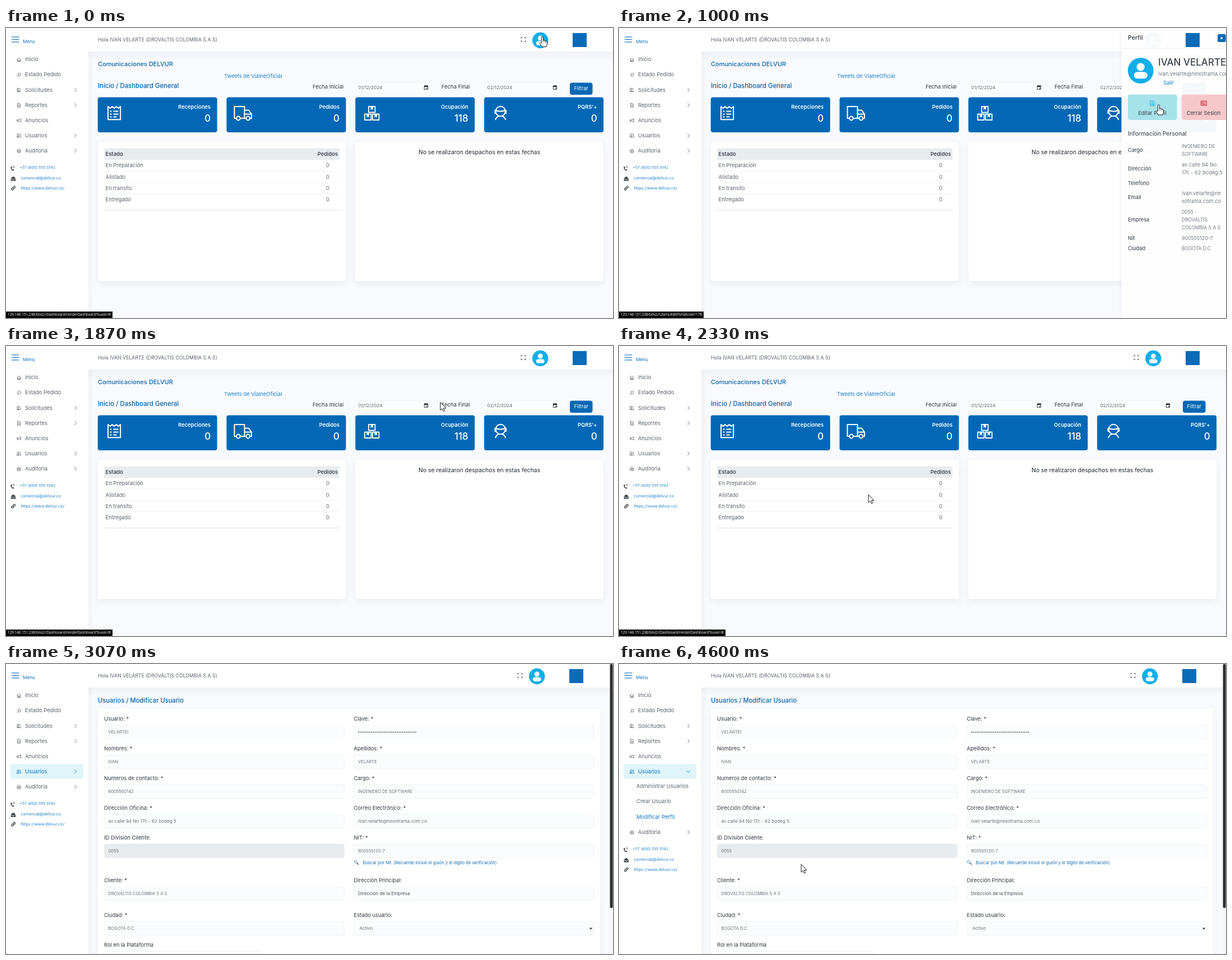
Write an HTML page with a canvas that moves like this. It is 1083 px wide and 517 px high and loops after 4.67 s.

```html
<!DOCTYPE html>
<html lang="es">
<head>
<meta charset="utf-8">
<title>Panel</title>
<style>
html, body { margin: 0; width: 100%; height: 100%; overflow: hidden; background: #fff; }
canvas { display: block; width: 1083px; height: 517px; }
</style>
</head>
<body>
<canvas id="stage"></canvas>
<script>
const W = 1083, H = 517, LOOP = 4670, STEP = LOOP / 70;
const canvas = document.getElementById('stage');
const c = canvas.getContext('2d');
const dpr = window.devicePixelRatio || 1;
canvas.width = W * dpr;
canvas.height = H * dpr;

const BLUE = '#0268b6', LINK = '#1c80c9', GRAY = '#5c636c', DARK = '#2f363f', SOFT = '#737a83';
const BRAND = 'DELVUR', USER = 'IVAN VELARTE', MAIL = 'ivan.velarte@nexotrama.com.co';
const FIRM = 'DROVALTIS COLOMBIA S A S', NIT = '900555120-7';
const HOST = '129.146.151.238/bilv2//';
const DASH_URL = HOST + 'Dashboard/renderDashboardTouser/#';
const EDIT_URL = HOST + 'Users/editPortalUser/178';

const clamp = v => Math.max(0, Math.min(1, v));
const ramp = (t, a, b) => clamp((t - a) / (b - a));
const ease = v => v * v * (3 - 2 * v);

// y is the middle of the capitals
function text(s, x, y, size, color, weight = 400, align = 'left', family = 'Inter') {
  c.font = `${weight} ${size}px ${family}, "Open Sans", sans-serif`;
  c.fillStyle = color;
  c.textAlign = align;
  c.fillText(s, x, y + size * 0.36);
}

function box(x, y, w, h, r, fill, line) {
  c.beginPath();
  c.roundRect(x, y, w, h, r);
  c.fillStyle = fill;
  c.fill();
  if (line) { c.strokeStyle = line; c.lineWidth = 0.8; c.stroke(); }
}

function card(x, y, w, h) {
  c.save();
  c.shadowColor = 'rgba(40,60,100,.07)';
  c.shadowBlur = 14 * dpr;
  c.shadowOffsetY = 5 * dpr;
  box(x, y, w, h, 4, '#fff');
  c.restore();
}

function path(d, x, y, { line, fill, w = 0.9 }) {
  const p = new Path2D(d);
  c.save();
  c.translate(x, y);
  if (fill) { c.fillStyle = fill; c.fill(p); }
  if (line) { c.strokeStyle = line; c.lineWidth = w; c.lineJoin = 'round'; c.stroke(p); }
  c.restore();
}

function disc(x, y, r, fill) {
  c.beginPath();
  c.arc(x, y, r, 0, Math.PI * 2);
  c.fillStyle = fill;
  c.fill();
}

function rule(x1, x2, y, color, w = 0.8) {
  c.fillStyle = color;
  c.fillRect(x1, y - w / 2, x2 - x1, w);
}

function avatar(x, y, r) {
  disc(x, y, r, '#12aee9');
  c.save();
  c.beginPath();
  c.arc(x, y, r * 0.9, 0, Math.PI * 2);
  c.clip();
  disc(x, y - r * 0.28, r * 0.31, '#fff');
  box(x - r * 0.52, y + r * 0.1, r * 1.04, r * 0.52, r * 0.26, '#fff');
  c.restore();
}

const ICONS = {
  home: 'M-3.6 0L0-3.2 3.6 0M-2.5-.8V3.4H2.5V-.8M-.8 3.4V1H.8V3.4',
  search: 'M3.3-.6A2.6 2.6 0 1 1-1.9-.6 2.6 2.6 0 1 1 3.3-.6M-1.2 1.2L-3.4 3.4',
  edit: 'M1.2-3H-3V3H3V0M-1.2 1.2L3.2-3.2M-2-1H0M-2 2H1',
  doc: 'M-2.5-3.5H1L2.7-1.8V3.5H-2.5ZM-1.2-.5H1.4M-1.2 1.5H1.4',
  horn: 'M-3.5-1H-.5L3.3-2.8V2.8L-.5 1H-3.5ZM-2 1V3.2',
  users: 'M.2-1.4A1.7 1.7 0 1 1-3.2-1.4 1.7 1.7 0 1 1 .2-1.4M-4 3Q-3.6 1-1.5 1T1 3ZM1-3Q3.2-3 2.8-.5L1.5 0M2.2.8A1.4 1.4 0 1 1 2.1 3.6',
  audit: 'M-3.5-.2L0-3.2 3.5-.2M-3.2 0H3.2L2.6 3.2H-2.6ZM0 0V3.2'
};
const MENU = [['Inicio', 'home'], ['Estado Pedido', 'search'], ['Solicitudes', 'edit', 1],
  ['Reportes', 'doc', 1], ['Anuncios', 'horn'], ['Usuarios', 'users', 1], ['Auditoria', 'audit', 1]];

function chevron(x, y, turn, color) {
  c.save();
  c.translate(x, y);
  c.rotate(turn * Math.PI / 2);
  path('M-1.6-3.4L1.8 0-1.6 3.4', 0, 0, { line: color });
  c.restore();
}

function sidebar(open, active) {
  c.fillStyle = '#fff';
  c.fillRect(0, 0, 147, H);
  for (const y of [16, 20.5, 25]) rule(10, 23.5, y, '#1678c4', 1.2);
  text('Menu', 30, 24, 8.2, '#0e72bf');
  if (active) box(8, 178, 130, 27, 4, '#dff5fa');
  const drop = 81 * open;
  MENU.forEach(([name, icon, sub], i) => {
    const on = active && i === 5;
    const y = 56 + i * 27.05 + (i > 5 ? drop : 0);
    const color = on ? '#0b73bf' : GRAY;
    path(ICONS[icon], 23, y + 0.5, { line: color, w: 0.85 });
    text(name, 34, y, 9.45, color);
    if (sub) chevron(124, y + 0.5, on ? open : 0, color);
  });
  if (open) {
    c.save();
    c.beginPath();
    c.rect(0, 205, 147, drop);
    c.clip();
    text('Administrar Usuarios', 31, 218, 9.45, GRAY);
    text('Crear Usuario', 31, 245, 9.45, GRAY);
    text('Modificar Perfil', 31, 272.5, 9.45, '#0b73bf');
    c.restore();
  }
  path('M-3-2.8L-1.2-3.2-.4-1-1.4 0Q-.8 2 .6 2.4L1.6 1.6 3.2 3 2 4.4Q-3.6 4-3-2.8', 11.5, 250 + drop, { fill: '#41474e' });
  path('M0-3Q3-3 3 .2M0-1.2Q1.2-1.2 1.2.2', 12.4, 249 + drop, { line: '#41474e', w: 0.8 });
  path('M-4.2-.8L0-4 4.2-.8V4H-4.2Z', 13, 268.5 + drop, { fill: '#41474e' });
  path('M-4-.2L0 2.2 4-.2', 13, 268.5 + drop, { line: '#fff', w: 0.8 });
  c.save();
  c.translate(13, 285.5 + drop);
  c.rotate(-Math.PI / 4);
  path('M0-1.6H-2.6A1.6 1.6 0 0 0-2.6 1.6H-.6M0 1.6H2.6A1.6 1.6 0 0 0 2.6-1.6H.6M-1.6 0H1.6', 0, 0, { line: '#41474e', w: 1.3 });
  c.restore();
  text('+57 (600) 555 0142', 24.5, 248.5 + drop, 6.8, LINK);
  text('comercial@delvur.co', 26.5, 267 + drop, 7.2, LINK);
  text('https://www.delvur.co/', 26.5, 285.5 + drop, 7.2, LINK);
}

function logo(dx) {
  c.fillStyle = '#0b6bb8';
  c.fillRect(1011 + dx, 9, 25, 25);
}

function frame(dx, pics) {
  c.fillStyle = '#f9fafd';
  c.fillRect(0, 0, W, H);
  let g = c.createLinearGradient(0, 42, 0, 58);
  g.addColorStop(0, 'rgba(60,70,90,.05)');
  g.addColorStop(1, 'rgba(60,70,90,0)');
  c.fillStyle = g;
  c.fillRect(147, 42, W - 147, 16);
  g = c.createLinearGradient(147, 0, 157, 0);
  g.addColorStop(0, 'rgba(60,70,90,.045)');
  g.addColorStop(1, 'rgba(60,70,90,0)');
  c.fillStyle = g;
  c.fillRect(147, 42, 10, H - 42);
  c.fillStyle = '#fff';
  c.fillRect(147, 0, W - 147, 42);
  text(`Hola ${USER} (${FIRM})`, 164, 21, 8.75, GRAY);
  path('M-4-1.6V-3.8H-1.6M1.6-3.8H4V-1.6M4 1.6V3.8H1.6M-1.6 3.8H-4V1.6', 923 + dx, 20.5, { line: '#444b54', w: 1 });
  if (pics) { avatar(953.3 + dx, 22, 14.2); logo(dx); }
}

const TILES = [['Recepciones', '0'], ['Pedidos', '0'], ['Ocupación', '118'], ["PQRS'+", '0']];

function tileIcons() {
  const pen = { line: '#fff', w: 2 };
  path('M182 140l3.7 3 3.7-3 3.7 3 3.7-3 3.7 3 3.7-3V163.3H182Z', 0, 0, pen);
  path('M185.5 148.5h3M191.5 148.5h9M185.5 153.5h3M191.5 153.5h9M185.5 158.5h3M191.5 158.5h6', 0, 0, { line: '#fff', w: 1.8 });
  path('M411 161H407.5V140H425.5V161H418M425.5 146.5H433L438 153.5V161H435.5M425.5 161H428M425.5 153.5H437', 0, 0, pen);
  for (const x of [414.5, 431.8]) path('M3.4 0A3.4 3.4 0 1 1-3.4 0 3.4 3.4 0 1 1 3.4 0', x, 161, pen);
  for (const [x, y] of [[647, 140], [640, 153.5], [654, 153.5]]) {
    path('M0 0H11.5V10.5H0Z', x, y, { line: '#fff', w: 1.8 });
    path('M3.6 0H7.9V6L5.75 4.5 3.6 6Z', x, y, { fill: '#fff' });
  }
  path('M891 148.5A8.7 8.7 0 1 1 873.6 148.5 8.7 8.7 0 1 1 891 148.5M874 147Q882 150 890.5 147M873 164Q875 158.5 879 157M891.5 164Q889.5 158.5 885.5 157', 0, 0, pen);
  box(871.5, 146, 3.4, 7, 1, '#fff');
  box(889.8, 146, 3.4, 7, 1, '#fff');
}

function dateBox(x, value) {
  box(x, 97.5, 136, 18, 2, '#fcfdfe', '#f1f3f6');
  text(value, x + 5.5, 106, 8.2, '#5f666f');
  path('M-3.2-2.8H3.2V3.4H-3.2Z', x + 126.5, 106, { line: '#20242a', w: 0.9 });
  path('M-3.2-3.2H3.2V-1H-3.2ZM.3.6H2V2.3H.3ZM-2.2-4H-1.2V-3H-2.2ZM1.2-4H2.2V-3H1.2Z', x + 126.5, 106, { fill: '#20242a' });
}

function dashboard() {
  frame(0, true);
  text('Comunicaciones ' + BRAND, 164, 64.5, 11, '#0a63ab', 500);
  text('Tweets de VialneOficial', 389, 86, 9.4, LINK);
  text('Inicio / Dashboard General', 164, 103, 11.4, '#0a63ab', 500);
  text('Fecha Inicial', 547, 104.5, 9.45, DARK);
  text('Fecha Final', 777, 104.5, 9.45, DARK);
  dateBox(623, '01/12/2024');
  dateBox(853, '02/12/2024');
  box(1006, 97.5, 40.5, 21.5, 4, BLUE);
  text('Filtrar', 1026.2, 108, 9.4, '#fff', 400, 'center');
  TILES.forEach(([name, value], i) => {
    const x = 163.7 + i * 229.8;
    box(x, 123.5, 213, 62.5, 4, BLUE);
    text(name, x + 201.5, 141, 9.3, '#fff', 600, 'right');
    text(value, x + 201.5, 161, 17, '#fff', 500, 'right');
  });
  tileIcons();
  card(163.7, 203, 442.5, 248);
  card(623.3, 203, 442.5, 248);
  c.fillStyle = '#e9ecef';
  c.fillRect(175, 214.5, 420, 20.7);
  text('Estado', 177.5, 225, 9.4, '#414850', 600);
  text('Pedidos', 592, 225, 9.3, '#414850', 600, 'right');
  ['En Preparación', 'Alistado', 'En transito', 'Entregado'].forEach((s, i) => {
    const y = 245 + i * 20.2;
    text(s, 177.5, y, 9.4, GRAY);
    text('0', 574, y, 9.4, GRAY, 400, 'center');
    if (i < 3) rule(175, 595, y + 10.2, '#eceef1');
  });
  rule(175, 595, 324.3, '#d9dce0');
  text('No se realizaron despachos en estas fechas', 844.6, 221.5, 10.4, '#20262e', 400, 'center');
}

function profile(shown, hover) {
  if (!shown) return;
  c.save();
  c.translate(186.5 * (1 - shown), 0);
  c.save();
  c.shadowColor = 'rgba(40,60,100,.1)';
  c.shadowBlur = 8 * dpr;
  c.fillStyle = 'rgba(255,255,255,.955)';
  c.fillRect(896.5, 0, 190, H);
  c.restore();
  text('Perfil', 908, 17.5, 10.6, '#343b44', 500);
  box(1068, 11, 14.5, 14, 2.5, BLUE);
  path('M-1.8-1.8L1.8 1.8M1.8-1.8L-1.8 1.8', 1075.2, 18, { line: '#fff', w: 1.2 });
  rule(897, 1083, 36.8, '#eef0f3');
  avatar(930.8, 76, 23);
  text(USER, 962, 61, 17, '#3d444d', 500);
  text(MAIL, 962, 81.5, 9.3, SOFT);
  text('Salir', 971, 98, 9.4, LINK);
  const mix = (a, b) => Math.round(a + (b - a) * hover);
  box(908, 118.5, 87.5, 45.5, 4, `rgb(${mix(211, 166)},${mix(237, 226)},${mix(243, 234)})`);
  box(1004, 118.5, 87.5, 45.5, 4, 'rgba(247,198,200,.96)');
  path('M-4-4.3H2.4L4.2-2.5V4.3H-4.2ZM-2.4 2.5Q-2 .6 0 .6T2.4 2.5ZM1.3-1A1.3 1.3 0 1 1-1.3-1 1.3 1.3 0 1 1 1.3-1', 951.7, 134, { line: '#16b2e4' });
  path('M-5-4H5V4H-5ZM-3.4-2.2H-.4V.6H-3.4ZM1.2-2H3.6M1.2 0H3.6M-3.4 2.3H3.6', 1043.3, 134, { line: '#c8323c', w: 1 });
  text('Editar Perfil', 951.7, 152, 9.3, '#363e47', 400, 'center');
  text('Cerrar Sesion', 1043, 152, 9.3, '#363e47', 400, 'center');
  text('Información Personal', 908, 188, 10.3, '#4a515a', 500);
  const rows = [
    ['Cargo', 218, 8.5, 'INGENIERO DE', 'SOFTWARE'],
    ['Dirección', 251, 9.2, 'av calle 94 No', '17c - 62 bodeg 5'],
    ['Telefono', 276.5, 9.2],
    ['Email', 302, 9.2, 'ivan.velarte@ne', 'xotrama.com.co'],
    ['Empresa', 342, 8.5, '0055 -', 'DROVALTIS', 'COLOMBIA S A S'],
    ['Nit', 374.5, 8.8, NIT],
    ['Ciudad', 393, 8.5, 'BOGOTA D.C']
  ];
  for (const [name, y, size, ...lines] of rows) {
    text(name, 908, y, 9.2, '#4a515a', 500);
    lines.forEach((s, i) => text(s, 1004, y + (i - (lines.length - 1) / 2) * 14.2, size, SOFT));
  }
  c.restore();
  logo(0);
}

const ROWS = [
  [97, 'Usuario: *', 'VELARTEI', 'Clave: *', ''],
  [150, 'Nombres: *', 'IVAN', 'Apellidos: *', 'VELARTE'],
  [203, 'Numeros de contacto: *', '6005550142', 'Cargo: *', 'INGENIERO DE SOFTWARE'],
  [256, 'Dirección Oficina: *', 'av calle 94 No 17c - 62 bodeg 5', 'Correo Electrónico: *', MAIL],
  [309, 'ID División Cliente:', '0055', 'NIT: *', NIT],
  [385, 'Cliente: *', FIRM, 'Dirección Principal:', 'Dirección de la Empresa'],
  [447, 'Ciudad: *', 'BOGOTA D.C', 'Estado usuario:', 'Activo']
];

function field(x, y, label, value, dim) {
  text(label, x, y + 0.3, 9.4, DARK);
  box(x + 0.4, y + 12, 428, 24.6, 4, dim ? '#e9ecef' : '#fbfcfe', dim ? '#e4e7eb' : '#edf0f4');
  const caps = value === value.toUpperCase();
  const strong = value.startsWith('Direcc');
  text(value, x + (value === 'Activo' ? 10 : 7.5), y + 24.4, caps ? 7.6 : 8.1, strong ? '#4a5058' : '#6a7079');
}

function form(pics) {
  frame(-6, pics);
  text('Usuarios / Modificar Usuario', 164, 64.5, 11.2, '#0a63ab', 500);
  card(163.7, 79, 896.5, 460);
  for (const [y, l1, v1, l2, v2] of ROWS) {
    field(175, y, l1, v1, v1 === '0055');
    field(620.5, y, l2, v2);
  }
  for (let i = 0; i < 32; i++) disc(629.2 + i * 3.28, 121.5, 1.05, '#555c65');
  path('M1-1A2.6 2.6 0 1 1-4.2-1 2.6 2.6 0 1 1 1-1', 625.5, 353.5, { line: '#7fa9c6', fill: '#d8ecf7', w: 1 });
  path('M.4 1L3.8 4.2', 625.5, 353.5, { line: '#6b5a55', w: 1.6 });
  text('Buscar por Nit. (Recuerde incluir el guión y el dígito de verificación)', 636.5, 353.8, 7.5, '#1269b0');
  path('M-2-1.2L0 1 2-1.2', 1043.5, 471.5, { line: '#30363d', w: 1.3 });
  text('Rol en la Plataforma', 175, 500.3, 9.4, DARK);
  box(175.4, 512.3, 280, 24, 4, '#fbfcfe', '#edf0f4');
  c.fillStyle = '#f6f7f9';
  c.fillRect(1077, 0, 6, H);
  box(1077.6, 0, 5, 435, 2.5, '#2d2e30');
}

function status(t) {
  const alpha = t < 1300 ? (t < 925 ? 1 - ramp(t, 665, 870) : 1) : 1 - ramp(t, 2400, 2815);
  if (!alpha) return;
  const edit = t > 925 && t < 1660;
  c.globalAlpha = alpha;
  c.fillStyle = '#050505';
  c.fillRect(0, 505.5, edit ? 151 : 190, 11.5);
  text(edit ? EDIT_URL : DASH_URL, 3, 511, 6.36, '#fff', 400, 'left', '"Open Sans"');
  c.globalAlpha = 1;
}

// time, x, y of the pointer's hot spot
const TRACK = [[0, 957, 15.5], [70, 955, 17], [133, 951, 18], [267, 951, 18], [400, 955, 23], [530, 963, 38],
  [600, 966, 53], [733, 973, 97], [867, 968, 125], [1000, 963, 137], [1270, 962, 138], [1470, 962, 138],
  [1600, 930, 132], [1734, 840, 115], [1868, 775, 100.5], [1935, 780, 88], [2065, 778, 77], [2200, 640, 150],
  [2470, 250, 380], [2665, 60, 490], [2802, 30, 505.5], [2870, 22, 518]];
const ENTRY = [[4470, 102, 491], [4537, 240, 412], [4603, 325, 357]];
const SHAPES = {
  arrow: 'M0 0V14.2L3.2 11.2 5.4 16 7.6 15 5.5 10.4H10Z',
  hand: 'M-1.6 10V1.4A1.5 1.5 0 0 1 1.4 1.4V7L2.4 6.2 4.2 6.8 5 7.4 6.6 7.6 8.5 9V13.5L7 18H-.8L-4.6 12.6C-5.2 10.6-3.4 9.8-1.6 11.8Z',
  beam: 'M-3.2-6.8H-.8L0-6 .8-6.8H3.2M0-6V6M-3.2 6.8H-.8L0 6 .8 6.8H3.2'
};

function pointer(t) {
  const track = t < 3000 ? TRACK : ENTRY;
  if (t < track[0][0] - 5 || (t > 2860 && t < 4460)) return;
  let i = 1;
  while (i < track.length - 1 && track[i][0] < t) i++;
  const [ta, xa, ya] = track[i - 1], [tb, xb, yb] = track[i];
  const k = ramp(t, ta, tb);
  const x = xa + (xb - xa) * k, y = ya + (yb - ya) * k;
  if (t > 560 && t < 660) {
    path(SHAPES.beam, x, y, { line: '#fff', w: 2.4 });
    path(SHAPES.beam, x, y, { line: '#111', w: 1.2 });
    return;
  }
  const hand = t < 380 || (t > 690 && t < 1560);
  path(hand ? SHAPES.hand : SHAPES.arrow, x, y, { fill: '#fff', line: '#1c1c1c', w: 1 });
  if (hand) path('M1.4 7V10M4 7.4V10.2M6.4 8V10.6', x, y, { line: '#1c1c1c', w: 0.7 });
}

function draw(now) {
  const t = Math.floor(((now % LOOP) + 5) / STEP) % 70 * STEP;
  c.setTransform(dpr, 0, 0, dpr, 0, 0);
  if (t < 2860) {
    dashboard();
    sidebar(0, false);
    profile(ease(ramp(t, 265, 570)) * (1 - ease(ramp(t, 1530, 1835))), ramp(t, 735, 1000));
  } else {
    form(t > 3060);
    sidebar(ease(ramp(t, 3060, 3395)), t > 3060);
  }
  status(t);
  pointer(t);
}

const start = performance.now();
function tick() {
  draw(performance.now() - start);
  requestAnimationFrame(tick);
}
tick();
</script>
</body>
</html>
```
